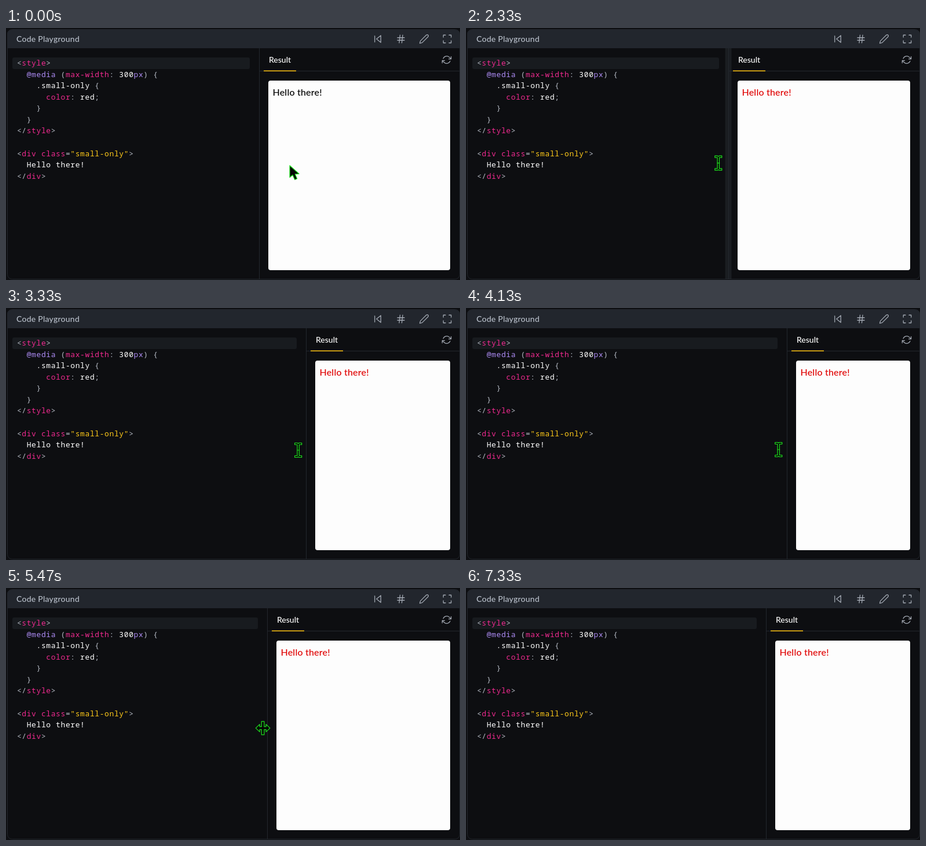
An HTML page that plays this animation: 784x436 px, repeating every 7.39 s.

```html
<!DOCTYPE html>
<html lang="en">
<head>
<meta charset="utf-8">
<title>Code Playground</title>
<style>
  html, body { margin: 0; width: 100%; height: 100%; overflow: hidden; background: #0d0e11; }
  svg { display: block; width: 784px; height: 436px; }
  text { white-space: pre; }
  .ui { font-family: Lato, "Open Sans", sans-serif; font-weight: 500; }
  .code { font: 13px "Noto Sans Mono", "DejaVu Sans Mono", monospace; letter-spacing: .6px; fill: #b6bbc5; }
  .tag { fill: #f02a90; }
  .at { fill: #ae8cf5; }
  .plain { fill: #fff; }
  .str { fill: #ffca1a; }
  .icon { fill: none; stroke: #a4aab4; stroke-linecap: round; stroke-linejoin: round; stroke-width: 1.7; }
  .edge { fill: none; stroke: #23272d; }
  .cursor { fill: #050805; stroke: #1fe01f; stroke-width: 1.2; stroke-linejoin: round; }
</style>
</head>
<body>
<svg viewBox="0 0 784 436">
  <rect width="784" height="436" fill="#0d0e11"/>
  <path d="M2 35V11a8 8 0 0 1 8-8H776a8 8 0 0 1 8 8V35Z" fill="#22262d"/>
  <rect class="edge" x="2.5" y="2.5" width="781" height="432" rx="8"/>
  <text class="ui" x="18" y="24" font-size="14" letter-spacing=".25" fill="#b9c0cb">Code Playground</text>
  <g id="icons"></g>

  <rect id="line" x="11" y="51" height="20" rx="3" fill="#181b1f"/>
  <g id="code"></g>

  <rect id="grip" y="35" width="11" height="399" fill="#1a1d21"/>
  <path id="rule" class="edge"/>
  <g id="pane">
    <text class="ui" x="1" y="60" font-size="14" fill="#fff">Result</text>
    <rect x="-8" y="73.5" width="56" height="1.5" fill="#ffc414"/>
  </g>
  <rect id="page" y="91" height="328" rx="4" fill="#fdfdfd"/>
  <text id="hello" class="ui" y="117" font-size="16" letter-spacing=".2">Hello there!</text>
  <path id="cursor" class="cursor"/>
</svg>
<script>
const $ = id => document.getElementById(id);
const LOOP = 7390, GRAB = 1700, DROP = 6400;

// icons on a 24 unit grid, placed by their centre
const icon = (x, y, scale, d) =>
  `<path class="icon" transform="translate(${x} ${y}) scale(${scale}) translate(-12 -12)" d="${d}"/>`;
const toolbar = [
  "M19 20 9 12 19 4ZM5 19V5",
  "M4 9H20M4 15H20M10 3 8 21M16 3 14 21",
  "M17 3a2.83 2.83 0 1 1 4 4L7.5 20.5 2 22l1.5-5.5Z",
  "M8 3H3V8M21 8V3H16M16 21H21V16M3 16V21H8"
];
$("icons").innerHTML = toolbar.map((d, i) => icon(642 + 40 * i, 19, .75, d)).join("") +
  icon(761, 55, .7, "M23 4v6h-6M1 20v-6h6M3.5 9a9 9 0 0 1 14.9-3.4L23 10M1 14l4.6 4.4A9 9 0 0 0 20.5 15");

// syntax colouring: each group of the pattern has its class
const source = `<style>
  @media (max-width: 300px) {
    .small-only {
      color: red;
    }
  }
</style>

<div class="small-only">
  Hello there!
</div>`;
const token = /("[^"]*")|(@\w+|px)|(style|div|class|max-width|color)|([a-zA-Z.][\w.!-]*|\d+)|[^\w"@.]/g;
const classes = ["str", "at", "tag", "plain"];
const escape = s => s.replace(/</g, "&lt;").replace(/>/g, "&gt;");
const colour = line => line.replace(token, (text, ...groups) => {
  const kind = classes.find((_, i) => groups[i]);
  return kind ? `<tspan class="${kind}">${text}</tspan>` : escape(text);
});
$("code").innerHTML = source.split("\n").map((line, i) =>
  `<text class="code" x="18.9" y="${65 + i * 19.58}">${colour(line)}</text>`).join("");

const shapes = {
  arrow: "M0 0V20.5L5 16.3 8.7 24.5 12.6 22.8 9.2 14.8 16 14.3Z",
  beam: "M-6-12.5H-1.5L0-11.5 1.5-12.5H6V-9.5H1.7V9.5H6V12.5H1.5L0 11.5-1.5 12.5H-6V9.5H-1.7V-9.5H-6ZM-2.5 0H2.5",
  resize: "M-2.3-11.5H2.3V-2.5H5.5V-6.5L12.3 0 5.5 6.5V2.5H2.3V11.5H-2.3V2.5H-5.5V6.5L-12.3 0-5.5-6.5V-2.5H-2.3Z"
};

// turning points of the drag: time, left edge of the page, pointer height
const turns = [
  [0, 453, 238], [GRAB, 453, 238], [2050, 493, 236], [2600, 446, 232], [3330, 534, 246],
  [4130, 570, 245], [4750, 442, 241], [5250, 442, 241], [5950, 550, 246], [DROP, 534, 245]
];

const ease = u => (u = Math.min(1, Math.max(0, u)), u * u * (3 - 2 * u));
const mix = (a, b, u) => a + (b - a) * u;

function drag(t) {
  const i = Math.max(1, turns.findIndex(p => p[0] > t));
  const b = t < DROP ? turns[i] : turns[turns.length - 1];
  const a = t < DROP ? turns[i - 1] : b;
  const u = a === b ? 1 : ease((t - a[0]) / (b[0] - a[0]));
  return [mix(a[1], b[1], u), mix(a[2], b[2], u)];
}

// the pointer slides past the bar, runs a little ahead of it, then leaves upwards
function pointer(t) {
  const [edge, y] = drag(t + 27);
  const exit = ease((t - DROP) / 800);
  return [edge - 15.5 + mix(52.5, -14, ease(t / 2100)) + 155 * exit, y - 290 * exit];
}

function set(id, attrs) {
  for (const name in attrs) $(id).setAttribute(name, attrs[name]);
}

function draw(t) {
  const left = Math.round(drag(t)[0]), bar = left - 15.5;
  const [x, y] = pointer(t);
  const kind = y < 35 || x > bar + 12 ? "arrow" : x < bar - 12 ? "beam" : "resize";
  set("line", { width: left - 43 });
  set("grip", { x: bar - 6, opacity: t > GRAB && t < 2400 ? 1 : 0 });
  set("rule", { d: `M${bar} 35V434M${bar} 74.5H783` });
  set("pane", { transform: `translate(${left})` });
  set("page", { x: left, width: 767 - left });
  set("hello", { x: left + 7.5, fill: 767 - left <= 300 ? "#e00000" : "#000" });
  set("cursor", { d: shapes[kind], transform: `translate(${x} ${y})` });
}

const start = performance.now();
function tick() {
  draw(Math.max(0, performance.now() - start) % LOOP);
  requestAnimationFrame(tick);
}
tick();
</script>
</body>
</html>
```
